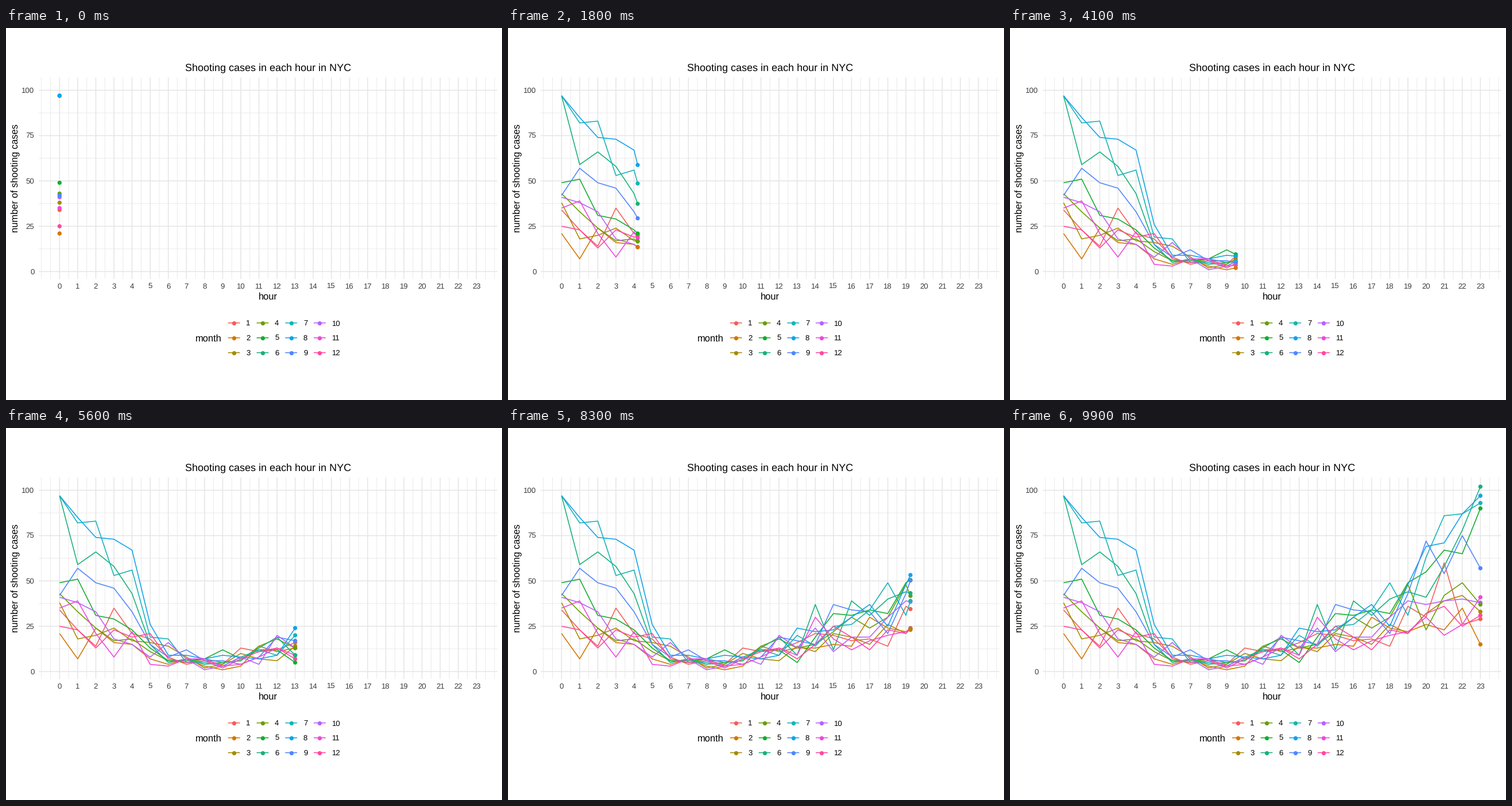
A matplotlib script for the animation above (10000 ms loop, 864 by 648 pixels).

```python
import numpy as np
import matplotlib.pyplot as plt
from matplotlib.animation import FuncAnimation

FRAMES = 100
HOURS = np.arange(24)
X0, DX = 93.3, 31.57        # pixel of hour 0, pixels per hour
Y0, DY = 424.3, 3.158       # pixel of 0 cases, pixels per case
LEFT, RIGHT, TOP, BOTTOM = 57, 855.7, 86.2, 437.1
GRID, TICK = "#E6E6E6", "#3C3C3C"
LINE_W, DOT = 1.07, 23.5

plt.rcParams.update({"font.family": "Liberation Sans", "text.hinting": "none"})
fig = plt.figure(figsize=(8, 6), dpi=108, facecolor="white")
ax = fig.add_axes([0, 0, 1, 1])
ax.set(xlim=(0, 864), ylim=(648, 0))
ax.axis("off")


def px(hour):
    return X0 + DX * np.asarray(hour)


def py(count):
    return Y0 - DY * np.asarray(count)


def stroke(x, y, color, width=LINE_W, z=2):
    line, = ax.plot(x, y, color=color, lw=width, zorder=z, snap=False,
                    solid_capstyle="butt", solid_joinstyle="round")
    return line


def label(x, y, text, size=8.8, color="black", ha="center", **kw):
    ax.text(x, y, text, fontsize=size, color=color, ha=ha, va="baseline", **kw)


months = []


def month(color, *counts):
    months.append((color, np.array(counts, float)))


month("#F35E5A", 34, 23, 14, 35, 21, 18, 8, 4, 6, 4, 13, 11,
      12, 16, 21, 20, 17, 18, 14, 36, 30, 60, 26, 29)
month("#D37600", 21, 7, 24, 16, 15, 7, 4, 7, 3, 1, 3, 14,
      11, 13, 13, 15, 14, 30, 24, 22, 26, 23, 35, 15)
month("#A68B00", 38, 18, 20, 24, 17, 16, 14, 8, 2, 4, 10, 7,
      6, 14, 11, 21, 19, 15, 26, 21, 32, 39, 42, 33)
month("#689E00", 43, 33, 24, 17, 18, 11, 6, 5, 7, 5, 6, 14,
      18, 13, 15, 22, 30, 24, 30, 48, 23, 42, 49, 37)
month("#12AE2C", 49, 51, 31, 29, 23, 13, 6, 6, 7, 12, 7, 12,
      12, 5, 19, 32, 31, 34, 32, 49, 55, 67, 65, 90)
month("#17B179", 97, 59, 66, 58, 43, 15, 5, 7, 4, 5, 6, 13,
      19, 9, 37, 12, 39, 31, 40, 44, 41, 58, 78, 102)
month("#17B3B7", 97, 82, 83, 53, 56, 19, 18, 5, 5, 3, 8, 12,
      9, 20, 14, 25, 26, 34, 49, 31, 63, 86, 87, 93)
month("#10A2EC", 97, 85, 74, 73, 67, 26, 9, 9, 7, 9, 8, 7,
      9, 24, 22, 23, 30, 37, 25, 48, 69, 71, 87, 97)
month("#5086FF", 42, 57, 49, 46, 33, 15, 8, 12, 6, 6, 4, 8,
      19, 17, 15, 37, 34, 33, 21, 43, 72, 54, 75, 57)
month("#B95FFF", 41, 38, 33, 18, 15, 8, 16, 7, 1, 3, 8, 4,
      20, 13, 24, 11, 19, 19, 30, 39, 37, 39, 40, 38)
month("#EE48DC", 35, 39, 21, 8, 22, 4, 3, 7, 7, 3, 4, 8,
      13, 9, 30, 18, 12, 17, 20, 22, 30, 20, 26, 41)
month("#FF489F", 25, 23, 13, 23, 19, 21, 7, 5, 6, 2, 7, 11,
      13, 7, 15, 25, 19, 12, 23, 21, 32, 36, 25, 31)

# grid, minor lines first
for h in np.arange(-1, 24.5, 0.5):
    major = h in HOURS
    stroke([px(h)] * 2, [TOP, BOTTOM], GRID, LINE_W if major else LINE_W / 2,
           1 if major else 0)
for c in np.arange(0, 101, 12.5):
    major = c % 25 == 0
    stroke([LEFT, RIGHT], [py(c)] * 2, GRID, LINE_W if major else LINE_W / 2,
           1 if major else 0)

# axes text
for h in HOURS:
    label(px(h), 454.3, str(h), color=TICK)
for c in range(0, 101, 25):
    label(49.5, py(c) + 4.7, str(c), color=TICK, ha="right")
mid = (LEFT + RIGHT) / 2
label(mid, 74.3, "Shooting cases in each hour in NYC", 12)
label(mid, 473, "hour", 11)
label(20.5, (TOP + BOTTOM) / 2, "number of shooting cases", 11,
      rotation=90, rotation_mode="anchor")

# legend, filled column by column
label(330, 545.5, "month", 11, ha="left")
for i, (color, _) in enumerate(months):
    x, y = 397.2 + 49.76 * (i // 3), 513.7 + 25.92 * (i % 3)
    stroke([x - 10.4, x + 10.4], [y, y], color)
    ax.scatter([x], [y], s=DOT, c=[color], lw=0, zorder=3, snap=False)
    label(x + 21.2, y + 4.7, str(i + 1), ha="left")

lines = [stroke([], [], color) for color, _ in months]
# dots stack in alphabetical order of the month number
order = sorted(range(12), key=lambda i: str(i + 1))
dots = ax.scatter(np.zeros(12), np.zeros(12), s=DOT, lw=0, zorder=4,
                  c=[months[i][0] for i in order], snap=False)

# each hour falls on a whole frame
key_frames = np.round(HOURS * (FRAMES - 1) / 23)


def update(frame):
    now = np.interp(frame, key_frames, HOURS)
    past = HOURS[HOURS < now]
    hours = np.append(past, now)
    ends = []
    for line, (_, counts) in zip(lines, months):
        values = np.interp(hours, HOURS, counts)
        line.set_data(px(hours), py(values))
        ends.append((px(now), py(values[-1])))
    dots.set_offsets([ends[i] for i in order])
    return [*lines, dots]


anim = FuncAnimation(fig, update, frames=FRAMES, interval=100,
                     init_func=lambda: update(0), repeat=True,
                     repeat_delay=0, blit=False)
plt.show()
```
